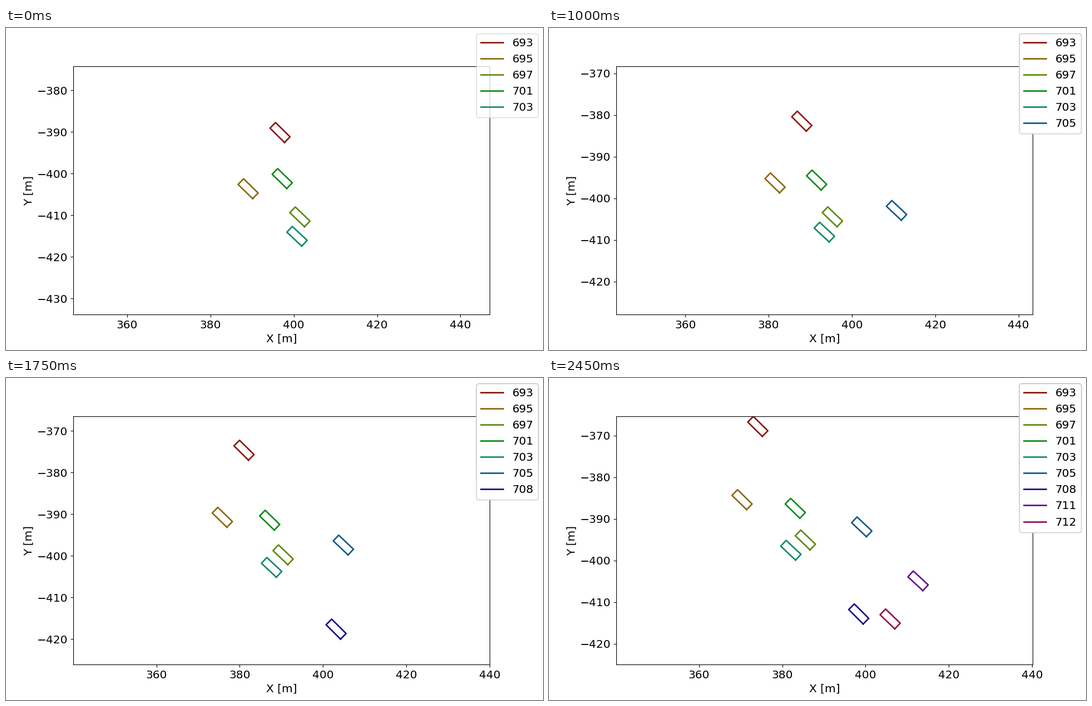
A matplotlib script that plays this animation: 966x580 px, repeating every 2500 ms.

```python
import colorsys

import matplotlib.pyplot as plt
import numpy as np
from matplotlib.animation import FuncAnimation
from matplotlib.ticker import MultipleLocator

W, H, DPI = 966, 580, 100
FRAMES, INTERVAL = 50, 50
LAST_STEP = 49
LEFT, RIGHT, BOTTOM, TOP = 0.1251, 0.9008, 0.11, 0.8802
HALF_X = 50
HALF_Y = HALF_X * (TOP - BOTTOM) * H / ((RIGHT - LEFT) * W)


class Car:
    """A box that drives up and left along its heading to an end point."""

    length, width = 4.9, 1.9

    def __init__(self, name, born, end, heading, speed, brake=0):
        self.name, self.born, self.end = name, born, np.array(end)
        self.speed, self.brake = speed, brake
        a = np.radians(heading)
        self.ahead = np.array([-np.cos(a), np.sin(a)])
        side = np.array([np.sin(a), np.cos(a)])
        u = np.array([[-1], [1], [1], [-1], [-1]]) * self.length / 2
        v = np.array([[-1], [-1], [1], [1], [-1]]) * self.width / 2
        self.outline = u * self.ahead + v * side

    def center(self, step):
        left = LAST_STEP - step
        way = self.speed * left + self.brake * left ** 2 / 2
        return self.end - way * self.ahead


cars = [
    Car(693, 0, (374.13, -367.78), 44.7, 0.648),
    Car(695, 0, (370.35, -385.39), 44.3, 0.501, brake=0.0013),
    Car(697, 0, (385.55, -395.07), 43.9, 0.451),
    Car(701, 0, (383.12, -387.46), 44.2, 0.371, brake=0.00125),
    Car(703, 0, (382.06, -397.54), 43.1, 0.506, brake=0.0007),
    Car(705, 7, (399.08, -391.92), 43.4, 0.533),
    Car(708, 32, (398.36, -412.86), 44.9, 0.450),
    Car(711, 39, (412.60, -404.90), 42.9, 0.451),
    Car(712, 42, (405.90, -414.06), 44.0, 0.450),
]

plt.rcParams.update({
    "font.family": "DejaVu Sans", "font.size": 14.5, "axes.labelpad": 3.87,
    "lines.linewidth": 1.93, "patch.linewidth": 0.97,
    "xtick.major.size": 3.4, "xtick.major.pad": 3.4,
    "ytick.major.size": 3.4, "ytick.major.pad": 3.4,
})
fig, ax = plt.subplots(figsize=(W / DPI, H / DPI), dpi=DPI)
fig.subplots_adjust(left=LEFT, right=RIGHT, bottom=BOTTOM, top=TOP)
ax.set_xlabel("X [m]")
ax.set_ylabel("Y [m]")
ax.xaxis.set_major_locator(MultipleLocator(20))
ax.yaxis.set_major_locator(MultipleLocator(10))

for i, car in enumerate(cars):
    color = colorsys.hls_to_rgb(i / len(cars) + 0.01, 0.3, 0.8)
    car.line, = ax.plot([], [], color=color, label=str(car.name))

# Translucent legends pile up; three layers are enough to look opaque.
legends = []
for start in sorted({car.born for car in cars}):
    handles = [car.line for car in cars if car.born <= start]
    for layer in range(3):
        legend = fig.legend(handles=handles, loc="upper right",
                            bbox_to_anchor=(1.0009, 1.0002))
        legends.append((start + layer, legend))


def draw(frame):
    step = np.interp(frame, [0, 7, 39, 49], [0, 6, 38, LAST_STEP])
    centers = []
    for car in cars:
        if frame < car.born:
            car.line.set_data([], [])
            continue
        center = car.center(step)
        car.line.set_data(*(center + car.outline).T)
        centers.append(center)

    # The view follows the mean position of all visible cars.
    cx, cy = np.mean(centers, axis=0)
    ax.set_xlim(cx - HALF_X, cx + HALF_X)
    ax.set_ylim(cy - HALF_Y, cy + HALF_Y)

    for start, legend in legends:
        legend.set_visible(frame >= start)
    return []


anim = FuncAnimation(fig, draw, frames=FRAMES, interval=INTERVAL,
                     init_func=lambda: draw(0), repeat=True, repeat_delay=0)
plt.show()
```
